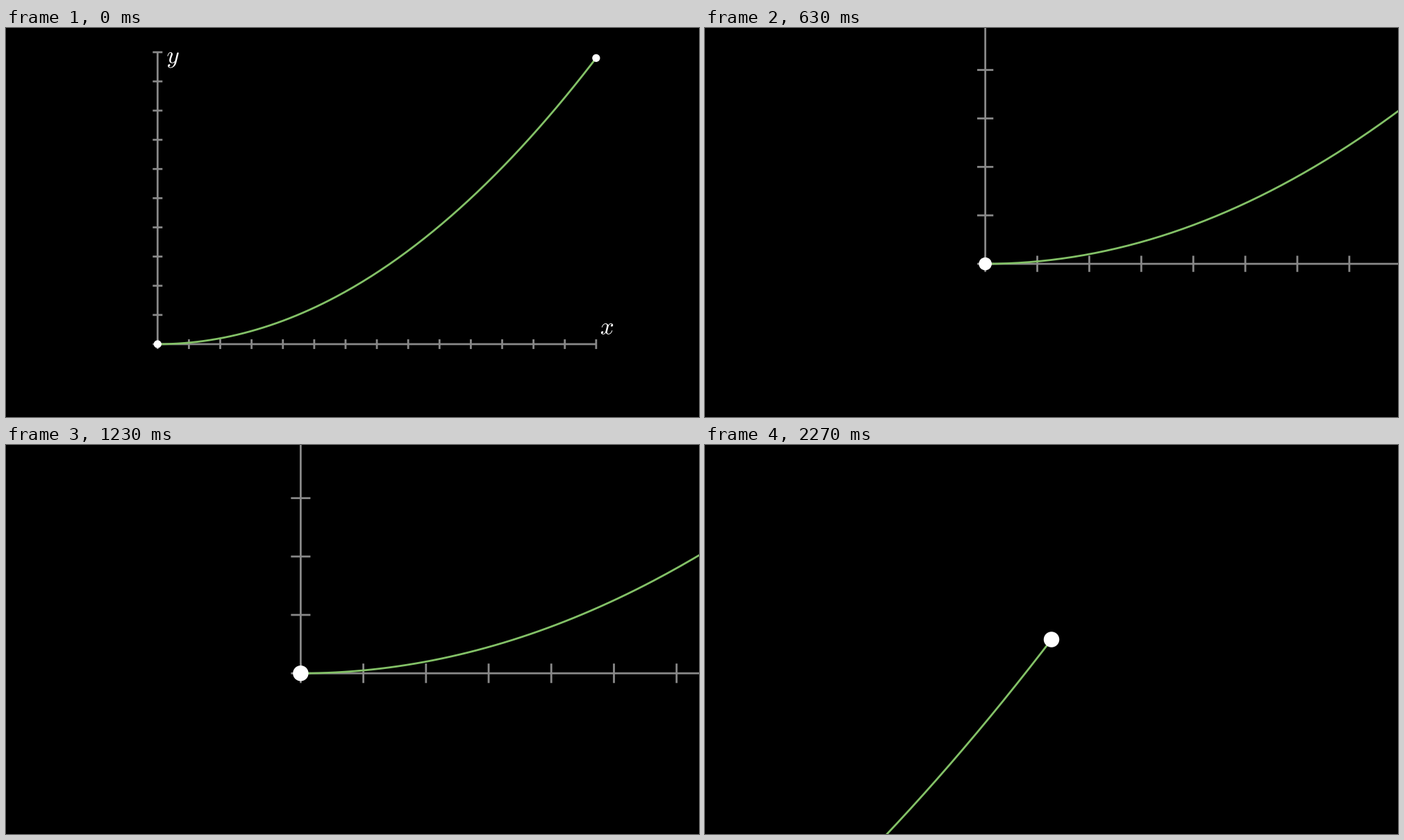
Write a matplotlib script that moves like this. It is 998 px wide and 561 px high and loops after 3010 ms.

```python
import math

import matplotlib.pyplot as plt
import numpy as np
from matplotlib.animation import FuncAnimation
from matplotlib.patches import Circle, PathPatch
from matplotlib.textpath import TextPath
from matplotlib.transforms import Affine2D

WIDTH, HEIGHT, DPI = 998, 561, 64
LOOP_MS, INTERVAL = 3010, 10
PLAY_STEPS = 30  # picture steps per camera move, at 30 steps a second

# Scene units: the full view is 128/9 wide and the graph's origin is (0, 0).
VIEW_W = 128 / 9
VIEW_H = VIEW_W * HEIGHT / WIDTH
AXIS_W, AXIS_H = 9, 6
X_MAX, Y_MAX = 14, 10
TICK = 0.1
STROKE = 2.8 * 72 / DPI
GREY, GREEN = "#888888", "#83C167"

START = np.array([0.0, 0.0])
END = np.array([AXIS_W, AXIS_H * X_MAX**2 / 20 / Y_MAX])
HOME = np.array([4.0, 2.5])

plt.rcParams["mathtext.fontset"] = "cm"
fig = plt.figure(figsize=(WIDTH / DPI, HEIGHT / DPI), dpi=DPI, facecolor="black")
ax = fig.add_axes([0, 0, 1, 1])
ax.axis("off")


def stroke(xs, ys, color):
    ax.plot(xs, ys, color=color, lw=STROKE, snap=False,
            solid_capstyle="butt", solid_joinstyle="round")


def label(text, x, y, top=False):
    """Place a glyph by the lower (or upper) left corner of its outline."""
    path = TextPath((0, 0), text, size=0.5)
    box = path.get_extents()
    shift = Affine2D().translate(x - box.x0, y - (box.y1 if top else box.y0))
    ax.add_patch(PathPatch(shift.transform_path(path), fc="white", lw=0, zorder=3))


def smooth(t):
    """Sigmoid easing from 0 to 1."""
    def sigmoid(v):
        return 1 / (1 + math.exp(-v))

    t = min(max(t, 0), 1)
    edge = sigmoid(-5)
    return min(max((sigmoid(10 * (t - 0.5)) - edge) / (1 - 2 * edge), 0), 1)


stroke([0, AXIS_W], [0, 0], GREY)
stroke([0, 0], [0, AXIS_H], GREY)
for x in np.linspace(0, AXIS_W, X_MAX + 1):
    stroke([x, x], [-TICK, TICK], GREY)
for y in np.linspace(0, AXIS_H, Y_MAX + 1):
    stroke([-TICK, TICK], [y, y], GREY)

u = np.linspace(0, 1, 200)
stroke(u * END[0], u**2 * END[1], GREEN)

label("$x$", AXIS_W + 0.1, TICK + 0.1)
label("$y$", TICK + 0.1, AXIS_H, top=True)
for spot in (START, END):
    ax.add_patch(Circle(spot, 0.08, fc="white", lw=0, zorder=4))


def update(frame):
    step = math.floor((frame + 0.5) * INTERVAL * 30 / 1000)
    zoom = smooth(step / PLAY_STEPS)
    pan = smooth(step / PLAY_STEPS - 1)
    cx, cy = HOME + (START - HOME) * zoom + (END - START) * pan
    half = (1 - zoom / 2) / 2
    ax.set_xlim(cx - VIEW_W * half, cx + VIEW_W * half)
    ax.set_ylim(cy - VIEW_H * half, cy + VIEW_H * half)
    return []


anim = FuncAnimation(fig, update, frames=LOOP_MS // INTERVAL, interval=INTERVAL,
                     repeat=True, repeat_delay=0, blit=False)
plt.show()
```
